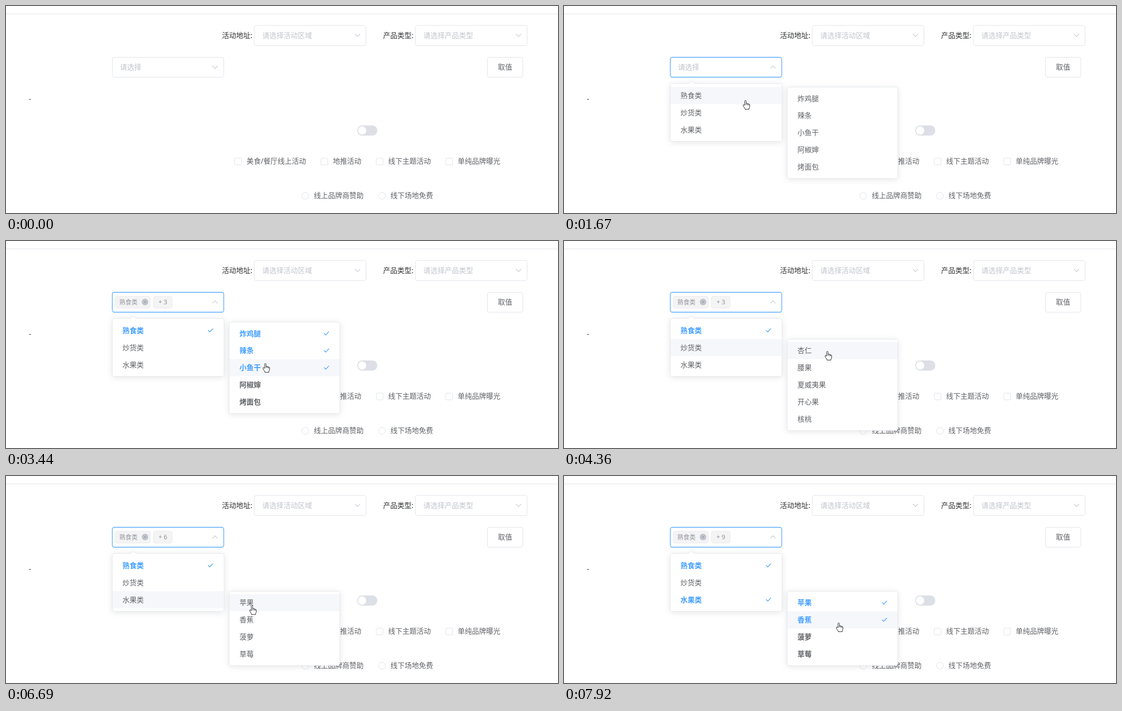
Animation of 1223x458 px, one loop 7.99 s. Source, as an HTML page:

```html
<!DOCTYPE html>
<html lang="zh-CN">
<head>
<meta charset="utf-8">
<title>多级多选下拉框</title>
<style>
html, body { margin: 0; width: 100%; height: 100%; overflow: hidden; background: #fff; }
svg { display: block; width: 1223px; height: 458px; }
text { font: 15.75px "Noto Sans", "Noto Sans CJK SC", sans-serif; fill: #606266; white-space: pre; }
.label { fill: #303133; }
.hint { fill: #c0c4cc; }
.bold { font-weight: 700; }
.on { fill: #409eff; font-weight: 700; }
.small { font-size: 13.5px; fill: #909399; }
.count { font-size: 14px; fill: #909399; }
.box { fill: #fff; stroke: #dcdfe6; }
.focus { stroke: #409eff; stroke-width: 1.3; }
.tag { fill: #f4f4f5; stroke: #e9e9eb; }
.panel { fill: #fff; stroke: #e4e7ed; filter: drop-shadow(0 2px 6.75px rgba(0, 0, 0, .1)); }
.hover { fill: #f5f7fa; }
.chevron { fill: none; stroke: #c0c4cc; stroke-width: 1.2; }
.check { fill: none; stroke: #409eff; stroke-width: 1.4; }
.cursor { fill: #fff; stroke: #111; stroke-linejoin: round; }
</style>
</head>
<body>
<svg viewBox="0 0 1223 458"><g id="page"></g><g id="live"></g></svg>
<script>
const LOOP = 7990, ROW = 37.85, EM = 15.75;
const FOCUS = 690, OPEN = 760, PRESS = 120;

const groups = [
  { name: '熟食类', open: 1250, items: ['炸鸡腿', '辣条', '小鱼干', '阿椒婶', '烤面包'] },
  { name: '炒货类', open: 3600, items: ['杏仁', '腰果', '夏威夷果', '开心果', '核桃'] },
  { name: '水果类', open: 5770, items: ['苹果', '香蕉', '菠萝', '草莓'] }
];

// Pointer stops: arrival time, position and the option clicked there
const stops = [
  [0, 640, 400],
  [FOCUS, 405, 140],
  [1520, 402.5, 209],
  [1840, 404, 196, '熟食类'],
  [2330, 540, 203, '炸鸡腿'],
  [2670, 568, 228, '辣条'],
  [3090, 575, 271, '小鱼干'],
  [3820, 468, 239],
  [4360, 584, 244, '杏仁'],
  [4740, 590, 305, '夏威夷果'],
  [5050, 590, 345, '开心果'],
  [5600, 492, 304.5],
  [5840, 458, 273],
  [6230, 545.5, 287],
  [6980, 455, 275, '水果类'],
  [7340, 572, 284, '苹果'],
  [7750, 609, 325, '香蕉']
];
const clicks = stops.filter(s => s[3]);
const picked = (name, t) => clicks.some(s => s[3] === name && t >= s[0] + PRESS);

const clamp = v => Math.max(0, Math.min(1, v));
const easeOut = v => 1 - (1 - clamp(v)) ** 3;
const smooth = v => (v = clamp(v)) * v * (3 - 2 * v);

// The pointer rests at each stop; longer trips take longer
function pointer(t) {
  const i = stops.findIndex(s => s[0] > t);
  if (i < 0) return { x: stops.at(-1)[1], y: stops.at(-1)[2], shown: true };
  const [, x0, y0] = stops[i - 1], [arrive, x1, y1] = stops[i];
  const travel = 120 + 1.3 * Math.hypot(x1 - x0, y1 - y0);
  const k = smooth(1 - (arrive - t) / travel);
  return { x: x0 + (x1 - x0) * k, y: y0 + (y1 - y0) * k, shown: i > 1 || k > 0 };
}

const text = (x, mid, s, cls = '', size = EM) =>
  `<text x="${x}" y="${mid + size * .37}" class="${cls}">${s}</text>`;
const rect = (x, y, w, h, cls, r = 4.5) =>
  `<rect x="${x}" y="${y}" width="${w}" height="${h}" rx="${r}" class="${cls}"/>`;
const chevron = (x, y, turn = 0) =>
  `<path class="chevron" transform="translate(${x} ${y}) rotate(${turn})" d="M-5.8-2.8L0 3L5.8-2.8"/>`;
const check = (x, y) => `<path class="check" d="M${x - 5.3} ${y - .3}l3.8 3.9l7-7.6"/>`;
const option = (x, mid, name, cls, checkX) =>
  text(x, mid, name, cls) + (cls === 'on' ? check(checkX, mid - .3) : '');

function choices(x, y, radius, names) {
  return names.map(name => {
    const out = rect(x, y, 15, 15, 'box', radius) + text(x + 26.4, y + 6.8, name);
    x += 59.5 + [...name].reduce((w, c) => w + (c === '/' ? .37 : 1) * EM, 0);
    return out;
  }).join('');
}

function drawPage() {
  const field = (x, label, hint) => text(x - 71.5, 65, label, 'label') +
    rect(x, 43, 247.5, 44.5, 'box') + text(x + 17.8, 65, hint, 'hint') + chevron(x + 228.7, 64.7);
  return '<path d="M0 17.5H1223" stroke="#dcdfe6"/>' +
    field(550, '活动地址:', '请选择活动区域') + field(907, '产品类型:', '请选择产品类型') +
    rect(1066.5, 113.5, 78.5, 44, 'box') + text(1090, 135.5, '取值') +
    text(50.5, 205, '-', 'label') +
    '<rect x="778" y="264.3" width="44.5" height="22.5" rx="11.2" fill="#dcdfe6"/><circle cx="789" cy="275.5" r="9.2" fill="#fff"/>' +
    choices(506.5, 336.5, 2, ['美食/餐厅线上活动', '地推活动', '线下主题活动', '单纯品牌曝光']) +
    choices(655.5, 412.5, 7.5, ['线上品牌商赞助', '线下场地免费']);
}

function drawSelect(t) {
  const count = clicks.filter(s => t >= s[0] + PRESS).length;
  const out = rect(235.5, 113.5, 247, 44, t >= FOCUS ? 'box focus' : 'box') +
    chevron(463, 135.3, 180 * easeOut((t - FOCUS) / 300));
  if (!count) return out + text(252.5, 135.5, '请选择', 'hint');
  return out + rect(242, 122, 77.5, 26.5, 'tag') + text(251, 135, clicks[0][3], 'small', 13.5) +
    '<circle cx="308" cy="135" r="7.3" fill="#c0c4cc"/><path d="M305.5 132.5l5 5m0-5l-5 5" stroke="#909399"/>' +
    (count > 1 ? rect(326.5, 122, 41.5, 26.5, 'tag') + text(337.7, 135, `+ ${count - 1}`, 'count', 14) : '');
}

function drawMenu(t, level) {
  if (t < OPEN) return '';
  const k = easeOut((t - OPEN) / 300);
  const rows = groups.map(({ name }, i) => {
    const mid = 198 + i * ROW, on = picked(name, t);
    return (i === level && !on ? rect(236, mid - 19, 246.5, ROW, 'hover', 0) : '') +
      option(258, mid, name, on ? 'on' : '', 453);
  }).join('');
  return `<g opacity="${k}" transform="translate(0 171.5) scale(1 ${k}) translate(0 -171.5)">
    <path class="panel" d="M240 171.5H275.5L282 166.5L288.5 171.5H478.5a4.5 4.5 0 0 1 4.5 4.5V295a4.5 4.5 0 0 1-4.5 4.5H240a4.5 4.5 0 0 1-4.5-4.5V176a4.5 4.5 0 0 1 4.5-4.5Z"/>${rows}</g>`;
}

function drawSubmenu(t, level, { x, y }) {
  if (level < 0) return '';
  const { name: parent, items } = groups[level], top = 179.5 + level * ROW;
  const plain = picked(parent, t) ? 'bold' : '';
  return rect(494.5, top, 245, items.length * ROW + 12.7, 'panel') +
    items.map((name, i) => {
      const mid = top + 25.2 + i * ROW;
      const lit = x > 488 && Math.abs(y - mid) < ROW / 2;
      return (lit ? rect(495, mid - 19, 244, ROW, 'hover', 0) : '') +
        option(517.3, mid, name, picked(name, t) ? 'on' : plain, 710);
    }).join('');
}

function drawCursor(t, { x, y, shown }) {
  if (!shown) return '';
  const hand = x < 482 && y > 113 && y < 293 || t > OPEN && x > 495;
  const shape = hand
    ? 'M-2 11V1.5Q-2 0-.5 0T1 1.5V6.5Q4 5.5 4 7.2Q6.6 6.4 6.6 8.2Q9 7.6 9 9.5V13Q9 15 7.5 17V19.5H-1.5V18Q-5 13.5-5.5 11Q-6 9-4.3 9Q-3 9.2-2 11ZM1 6.5V10M4 7.2V10.5M6.6 8.2V11'
    : 'M0 0V13.5L3 10.8L5.2 16L7.4 15L5.2 10H9.5Z';
  return `<path class="cursor" transform="translate(${x} ${y})" d="${shape}"/>`;
}

const live = document.getElementById('live');
document.getElementById('page').innerHTML = drawPage();

const start = performance.now();
function frame() {
  const t = (performance.now() - start) % LOOP;
  const level = groups.filter(g => t >= g.open).length - 1, at = pointer(t);
  live.innerHTML = drawSelect(t) + drawMenu(t, level) + drawSubmenu(t, level, at) + drawCursor(t, at);
  requestAnimationFrame(frame);
}
frame();
</script>
</body>
</html>
```
